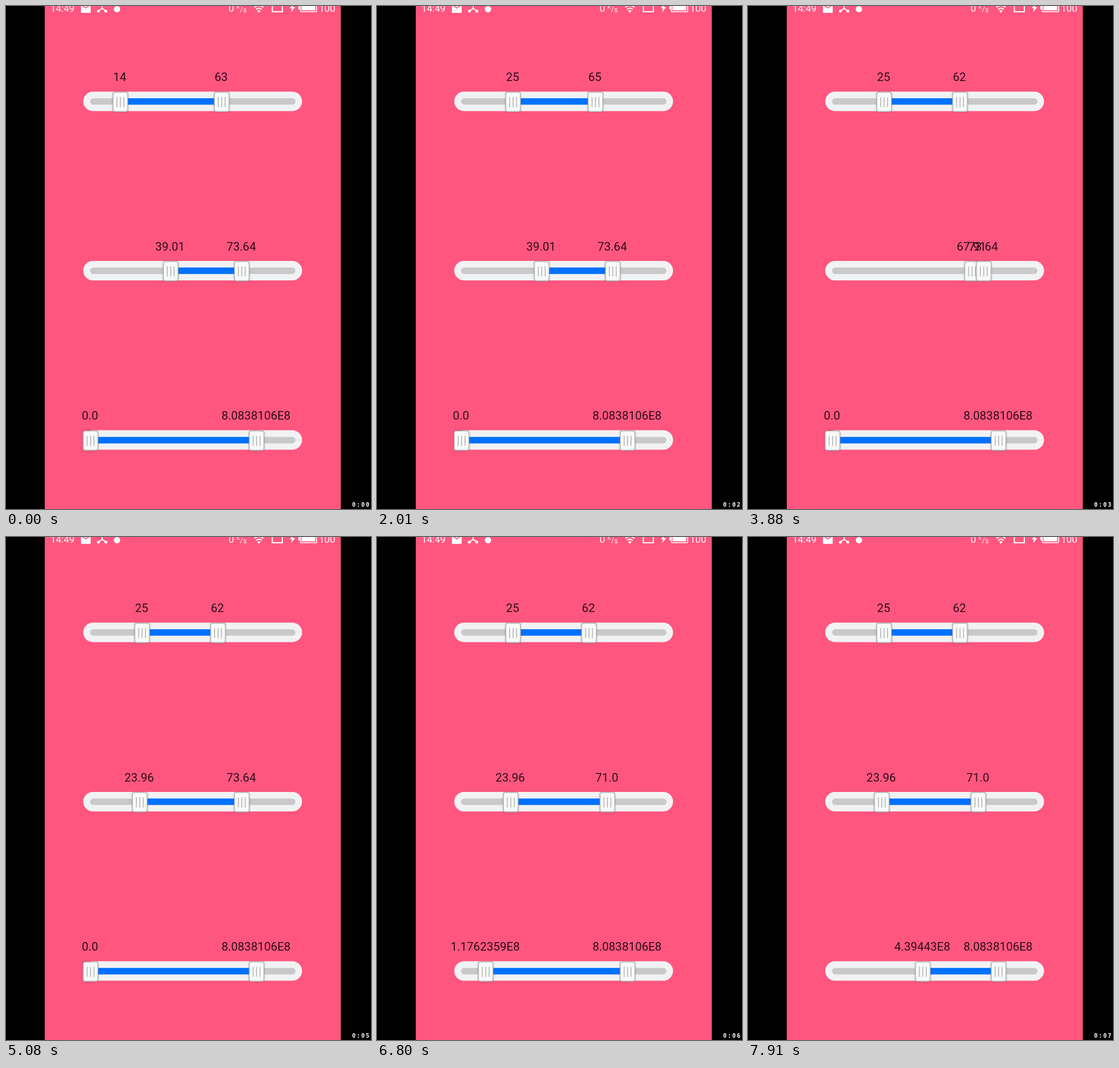
These frames come from a looping animation (638x878 px, 8000 ms). An HTML page with a canvas:

```html
<!DOCTYPE html>
<html lang="en">
<head>
<meta charset="utf-8">
<title>Range sliders</title>
<style>
html, body { margin: 0; width: 100%; height: 100%; overflow: hidden; background: #000; }
canvas { display: block; }
</style>
</head>
<body>
<canvas id="stage" width="638" height="878"></canvas>
<script>
const ctx = document.getElementById('stage').getContext('2d');
const LOOP = 8000, STEP = 75, PITCH = 295.6, PINK = '#ff567f', FONT = 'Roboto, sans-serif';
const LEFT = 0, RIGHT = 1;

// Java-like number labels
const point = s => s.includes('.') ? s : s + '.0';
const whole = v => String(Math.floor(v));
const cents = v => point(String(Math.round(v * 100) / 100));
function sci(v) {
  if (!v) return '0.0';
  const f = Math.fround(v * 1e7);
  let p = 1;
  while (p < 9 && Math.fround(+f.toPrecision(p)) !== f) p++;
  const [m, e] = f.toExponential(p - 1).split('e+');
  return point(m) + 'E' + e;
}

// Values run from 0 to 100 along each track; a drag goes from the present value to `end`
const drag = (from, to, side, end, power = 1) => ({ from, to, side, end, power });
const sliders = [
  {
    start: [14.5, 63.85], label: whole,
    drags: [
      drag(190, 940, LEFT, 25.1),
      drag(1250, 1640, RIGHT, 100),
      drag(1760, 2010, RIGHT, 65.2),
      drag(2100, 2400, RIGHT, 25.1),
      drag(2740, 3340, RIGHT, 62.05, 1.5)
    ]
  },
  {
    start: [39.01, 73.64], label: cents,
    drags: [
      drag(3730, 3970, LEFT, 73.64, 1.2975),
      drag(4310, 5080, LEFT, 23.96, 1.5),
      drag(5140, 5370, RIGHT, 100),
      drag(5520, 5870, RIGHT, 70.86, 2.625),
      drag(6020, 6020, RIGHT, 71)
    ]
  },
  {
    start: [0, 80.838106], label: sci,
    drags: [
      drag(6720, 7490, LEFT, 64.69297756),
      drag(7550, 7910, LEFT, 43.9443, 1.5)
    ]
  }
];

// Each drag advances in even steps and slows down by its power
function valuesAt({ start, drags }, t) {
  const vals = [...start];
  for (const { from, to, side, end, power } of drags) {
    if (t < from) break;
    const last = Math.round((to - from) / STEP);
    const step = t >= to ? last : Math.floor((t - from) / (to - from) * last + 0.25);
    const left = (1 - (step + 1) / (last + 1)) ** power;
    vals[side] = end + (vals[side] - end) * left;
  }
  return vals;
}

function box(x, y, w, h, r, fill) {
  ctx.fillStyle = fill;
  ctx.beginPath();
  ctx.roundRect(x, y, w, h, r);
  ctx.fill();
}

function text(s, x, y, size, color = '#fff', align = 'left') {
  ctx.font = `${size}px ${FONT}`;
  ctx.fillStyle = color;
  ctx.textAlign = align;
  ctx.fillText(s, x, y);
}

function path(d, width) {
  const p = new Path2D(d);
  if (width) { ctx.lineWidth = width; ctx.stroke(p); } else ctx.fill(p);
}

function thumb(x) {
  ctx.save();
  ctx.shadowColor = 'rgba(0,0,0,.3)';
  ctx.shadowBlur = 3;
  box(x - 13.5, 150, 27, 35, 4, '#b8b8b8');
  ctx.restore();
  box(x - 12, 151.2, 24, 32, 3, '#f8f9f9');
  for (const dx of [-6, 0, 6]) box(x + dx - 0.8, 159, 1.6, 17.5, 0, '#b7b7b7');
}

function slider(s, row, t) {
  const vals = valuesAt(s, t), [a, b] = vals.map(v => 147.8 + v * 3.59);
  ctx.save();
  ctx.translate(0, row * PITCH);
  box(135, 149.4, 382.5, 34, 17, '#f1f2f3');
  box(147, 161, 359, 11.2, 5.6, '#c9c9c9');
  box(a, 161, b - a, 11.2, 0, '#0072ff');
  thumb(a);
  thumb(b);
  [a, b].forEach((x, i) => text(s.label(vals[i]), x - 1, 131, 20.5, 'rgba(0,0,0,.82)', 'center'));
  ctx.restore();
}

function statusBar() {
  text('14:49', 77.5, 9.5, 17);
  box(131, -4, 17, 16, 1, '#fff');
  ctx.strokeStyle = PINK;
  path('M133 -1L139.5 3.5L146 -1', 1.6);
  ctx.strokeStyle = ctx.fillStyle = '#fff';
  path('M168 -3V4L161.5 9M168 4L174.5 9', 2);
  for (const x of [161.5, 174.5]) box(x - 2.5, 6.5, 5, 5, 2.5, '#fff');
  box(188.5, 0, 11, 11, 5.5, '#fff');

  text('0', 389, 9.5, 17);
  text('K', 403, 5, 9);
  text('/', 409, 10, 13);
  text('s', 414.5, 10.5, 12);
  path('M434 2.5Q442 -4 450 2.5', 2);
  path('M437 6Q442 1.5 447 6', 2);
  path('M439 8.5Q442 6 445 8.5L442 12Z');
  path('M465.5 -3V10H483V-3', 2);
  path('M502 -4L496 4H500L498 11L505.5 2H501.5L504 -4Z');
  path('M514.5 -4V8.5Q514.5 10 516 10H541.5Q543 10 543 8.5V-4', 1.6);
  box(511, 0, 3, 6, 1, '#fff');
  box(516.5, -4, 24, 11.5, 0, '#fff');
  text('100', 547, 9.5, 17);
}

function clock(t) {
  ctx.font = 'bold 10px "DejaVu Sans Mono", monospace';
  ctx.fillStyle = '#fff';
  ctx.textAlign = 'left';
  [...'0:0' + Math.floor(t / 1000)].forEach((c, i) => ctx.fillText(c, 605 + i * 8, 874));
}

function draw(now) {
  const t = now % LOOP;
  box(0, 0, 638, 878, 0, '#000');
  box(67.8, 0, 517.4, 878, 0, PINK);
  statusBar();
  sliders.forEach((s, row) => slider(s, row, t));
  clock(t);
}

let origin;
function frame(now) {
  origin ??= now;
  draw(now - origin);
  requestAnimationFrame(frame);
}
draw(0);
requestAnimationFrame(frame);
</script>
</body>
</html>
```
